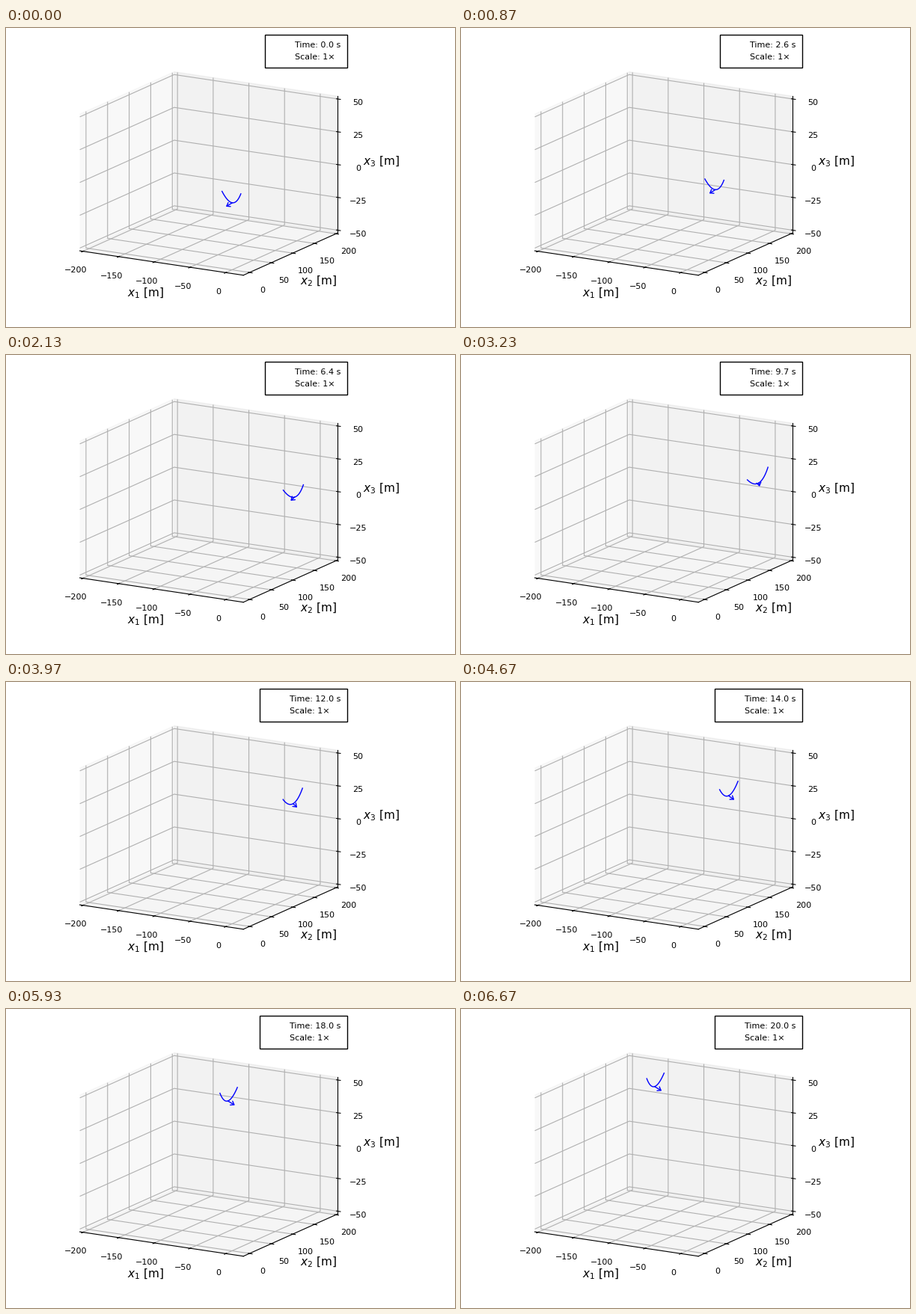
Write a matplotlib script that moves like this. It is 600x400 px and loops after 6710 ms.

```python
import numpy as np
import matplotlib.pyplot as plt
from matplotlib.animation import FuncAnimation
from matplotlib.lines import Line2D
from matplotlib.patches import FancyArrowPatch
from matplotlib.transforms import Affine2D

W, H, DPI = 600, 400, 100
FRAMES, LOOP_MS = 201, 6710
INTERVAL = LOOP_MS / FRAMES
STEP_MS = 100 / 3  # the clock advances 0.1 s per step
MARGIN = 1 / 48

plt.rcParams.update({"font.family": "DejaVu Sans", "font.size": 8})
fig = plt.figure(figsize=(W / DPI, H / DPI), dpi=DPI)

side = 392.2
ax = fig.add_axes([69.58 / W, 3.9 / H, side / W, side / H], projection="3d")
ax.set_proj_type("ortho")
ax.view_init(elev=15, azim=-60)


def padded(lo, hi):
    pad = (hi - lo) * MARGIN
    return lo - pad, hi + pad


def tick_text(value, _):
    # The empty first line lowers the label by one descent
    return f"\n{value:.0f}".replace("-", "\N{MINUS SIGN}")


ax.set(xlim=padded(-200, 20), ylim=padded(-10, 200), zlim=padded(-50, 50),
       xticks=range(-200, 1, 50), yticks=range(0, 201, 50),
       zticks=range(-50, 51, 25))
for i, axis in enumerate((ax.xaxis, ax.yaxis, ax.zaxis), 1):
    axis.set_rotate_label(False)
    axis.set_label_text(f"$x_{i}$ [m]", fontsize=11, rotation=0)
    axis.set_major_formatter(tick_text)
    for label in axis.get_ticklabels():
        label.set_linespacing(0)

blank = [Line2D([], [], linestyle="none") for _ in range(2)]
legend = ax.legend(blank, ["Time: 0.0 s", "Scale: 1×"], loc="upper right",
                   fontsize=8, borderpad=0.8, fancybox=False,
                   framealpha=1, edgecolor="black")
clock = legend.get_texts()[0]

# Wing and airflow arrow live in stage pixels, y down
stage = Affine2D().scale(1 / W, -1 / H).translate(0, 1) + fig.transFigure
wing = Line2D([], [], color="blue", lw=1, transform=stage)
arrow = FancyArrowPatch((0, 0), (1, 1), mutation_scale=10,
                        arrowstyle="->,head_length=0.3,head_width=0.22",
                        shrinkA=0, shrinkB=0, color="blue", lw=1,
                        transform=stage)
fig.add_artist(wing)
fig.add_artist(arrow)

TURN_T, TURN_W = 9.4, 4.1
span = np.linspace(-1, 1, 41)[:, None]


def position(t):
    """Steady drift that reverses sideways during the turn while climbing."""
    def log_cosh(time):
        return np.log(np.cosh((time - TURN_T) / TURN_W))

    def climb_lag(time):
        return np.tanh((time - 11.2) / 3)

    x = 302.5 - 1.23 * t + 66.8 * (log_cosh(0) - log_cosh(t))
    y = 233.8 - 6.6 * t - 0.06 * t**2 + 13 * (climb_lag(t) - climb_lag(0))
    return np.array([x, y])


def pose(t):
    """Half span, sag and airflow vectors, driven by the turn's progress."""
    turn = np.tanh((t - TURN_T) / TURN_W)
    bank = 1 - turn**2
    half = np.array([12 - 0.5 * turn + 1.8 * bank,
                     -0.75 - 2.75 * turn - 7.5 * bank])
    sag = np.array([1.2 * turn - 1.6 * bank, -14 - 0.3 * turn + 1.5 * bank])
    flow = np.array([0.4 + 9.2 * turn, 5.4 + 0.3 * turn - 0.6 * bank])
    return half, sag, flow


def draw(frame):
    step = min(int((frame + 0.93) * INTERVAL / STEP_MS), FRAMES - 1)
    t = step / 10
    mid = position(t)
    half, sag, flow = pose(t)
    wing.set_data(*(mid + span * half + span**2 * sag).T)
    arrow.set_positions(mid, mid + flow)
    clock.set_text(f"Time: {float(f'{t:.2g}'):.1f} s")
    return wing, arrow, clock


anim = FuncAnimation(fig, draw, frames=FRAMES, interval=INTERVAL,
                     repeat=True, repeat_delay=0, blit=False)
plt.show()
```
